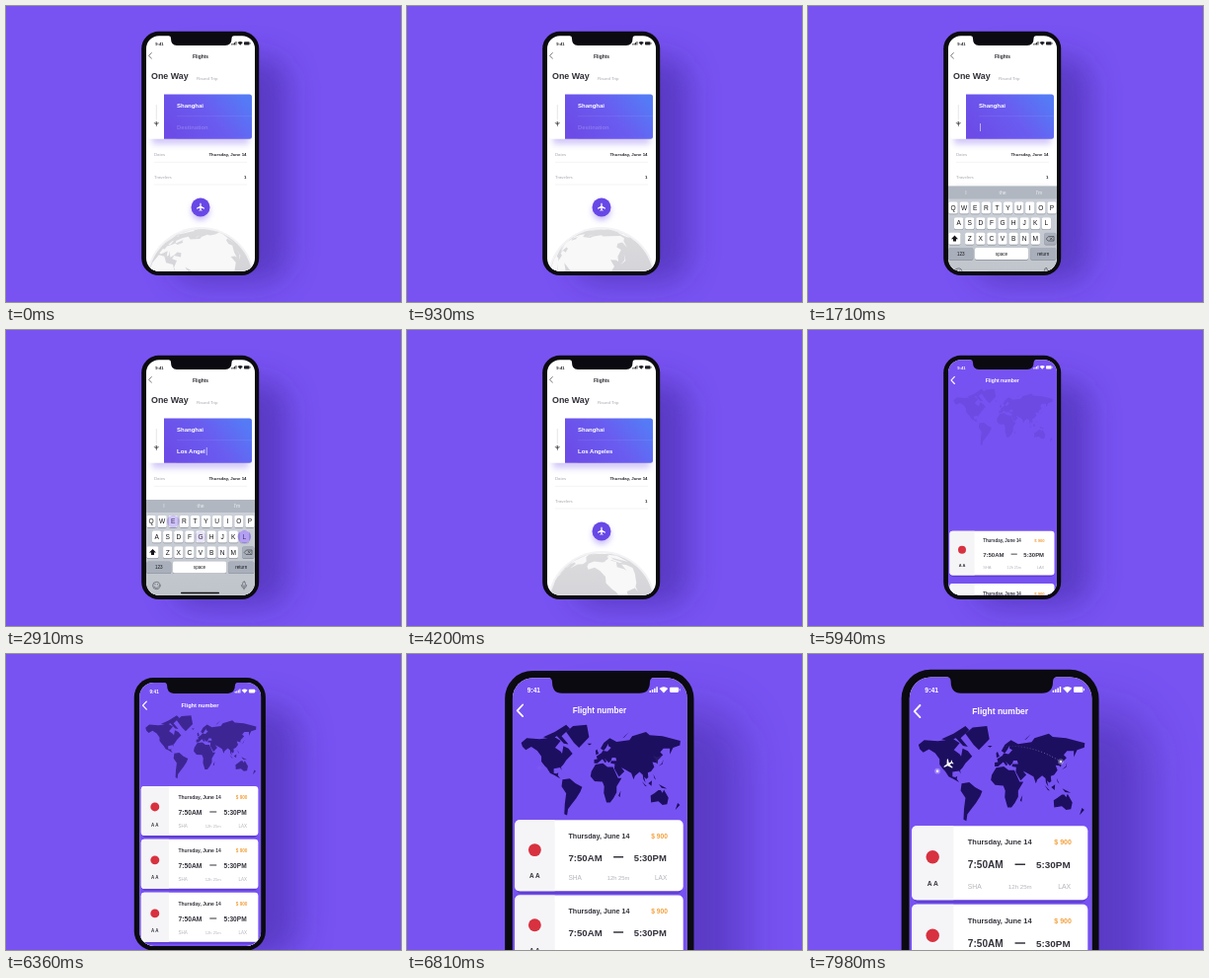
An HTML page that plays this animation: 400x300 px, repeating every 8000 ms.

```html
<!DOCTYPE html>
<html lang="en">
<head>
<meta charset="utf-8">
<title>Flight booking</title>
<style>
  html, body { margin: 0; width: 100%; height: 100%; overflow: hidden; background: #7853f2; }
  svg { display: block; width: 100%; height: 100%; }
  text { font-family: "Liberation Sans", Arial, sans-serif; }
  .b { font-weight: 700; }
  .m { text-anchor: middle; }
  .e { text-anchor: end; }
  .line { fill: none; stroke-linecap: round; stroke-linejoin: round; }
</style>
</head>
<body>
<svg viewBox="0 0 400 300">
  <defs>
    <clipPath id="screenClip"><rect x="142" y="30.300" width="110" height="238.500" rx="13"/></clipPath>
    <linearGradient id="ticketFill" x1="0" y1=".7" x2="1" y2=".3">
      <stop offset="0" stop-color="#6c4be6"/><stop offset=".55" stop-color="#6a5cf0"/><stop offset="1" stop-color="#557af6"/>
    </linearGradient>
    <linearGradient id="keysFill" x1="0" y1="0" x2="0" y2="1">
      <stop offset="0" stop-color="#cdd1d9"/><stop offset="1" stop-color="#bfc4cb"/>
    </linearGradient>
    <linearGradient id="oceanFill" x1="0" y1="0" x2="0" y2="1">
      <stop offset="0" stop-color="#dcdcdf"/><stop offset=".5" stop-color="#d3d3d7"/>
    </linearGradient>
    <linearGradient id="trailFade" gradientUnits="userSpaceOnUse" x1="195" y1="0" x2="225" y2="0">
      <stop offset="0" stop-color="#fff" stop-opacity="0"/><stop offset="1" stop-color="#fff" stop-opacity=".5"/>
    </linearGradient>
    <filter id="wide" x="-60%" y="-50%" width="220%" height="200%"><feGaussianBlur stdDeviation="15"/></filter>
    <filter id="soft" x="-50%" y="-50%" width="200%" height="200%"><feGaussianBlur stdDeviation="3"/></filter>
    <path id="plane" d="M0-5.2Q.8-4.8.8-3.4V-1.2L5 1.5V2.6L.8 1.3V3.6L2 4.5V5.2L0 4.7L-2 5.2V4.5L-.8 3.6V1.3L-5 2.6V1.5L-.8-1.2V-3.4Q-.8-4.8 0-5.2Z"/>
  </defs>
  <rect width="400" height="300" fill="#7853f2"/>
  <g id="phone">
    <rect x="168" y="52" width="118" height="228" rx="26" fill="#3a2399" opacity=".5" filter="url(#wide)"/>
    <rect x="137.200" y="25.800" width="119" height="247.200" rx="17.500" fill="#0b0a10"/>
    <g clip-path="url(#screenClip)">
      <rect x="142" y="30" width="110" height="239" fill="#fff"/>

      <g id="search">
        <path class="line" d="M147.400 47.500L144.500 50.300L147.400 53.100" stroke="#555" stroke-width=".8"/>
        <text class="b m" x="197" y="53" font-size="4.900" fill="#2c2c33">Flights</text>
        <text class="b" x="147" y="73.800" font-size="8.900" fill="#303038">One Way</text>
        <text x="193" y="75.300" font-size="4.400" fill="#a6a6b0">Round Trip</text>

        <rect x="148" y="98" width="98" height="42" fill="#6a4ae8" opacity=".3" filter="url(#soft)"/>
        <rect x="144" y="89.500" width="30" height="45.300" rx="2.500" fill="#fff"/>
        <path d="M160 89.500H246.500Q249 89.500 249 92V132.300Q249 134.800 246.500 134.800H160Z" fill="url(#ticketFill)"/>
        <path d="M152.300 100V115" stroke="#d5d5dc" stroke-width=".6"/>
        <use href="#plane" transform="translate(152.300 119.500) rotate(180) scale(.5)" fill="#444"/>
        <path d="M173 111.600H249" stroke="#fff" stroke-opacity=".12" stroke-width=".6"/>
        <text class="b" x="173" y="102.700" font-size="6" fill="#fff">Shanghai</text>
        <text class="b" id="placeholder" x="173" y="125.400" font-size="5.800" fill="#fff" opacity=".2">Destination</text>
        <text class="b" id="typed" x="173" y="125.400" font-size="6" fill="#fff"></text>
        <path id="caret" d="M0 119V127" stroke="#fff" stroke-width=".6"/>

        <g font-size="4.300" fill="#a6a6b0">
          <text x="150" y="152.200">Dates</text>
          <text x="150" y="175.200">Travelers</text>
        </g>
        <g class="b e" font-size="4.380" fill="#26262c">
          <text x="243.500" y="152.200">Thursday, June 14</text>
          <text x="243.500" y="175.200">1</text>
        </g>
        <path d="M150 158.300H244M150 181H244" stroke="#ececf0" stroke-width=".6"/>

        <circle cx="197" cy="279" r="55" fill="#f3f3f5"/>
        <circle cx="197" cy="279" r="53" fill="url(#oceanFill)"/>
        <path id="globeLand" fill="#f8f8f9"/>
        <circle cx="197" cy="208" r="9" fill="#6a4ae8" opacity=".4" filter="url(#soft)"/>
      </g>

      <circle id="bubble" cx="197" cy="204" r="9.500"/>
      <use id="bubblePlane" href="#plane" fill="#fff"/>

      <g id="keyboard">
        <rect x="142" y="172" width="110" height="97" fill="url(#keysFill)"/>
        <rect x="142" y="172" width="110" height="13" fill="#b1b7c1"/>
        <g class="m" font-size="5" fill="#eceef2">
          <text x="160" y="180">I</text><text x="197" y="180">the</text><text x="234" y="180">I'm</text>
        </g>
        <g id="keys"></g>
        <g id="taps" fill="#7350e6"></g>
        <g class="line" stroke="#555a62" stroke-width=".7">
          <circle cx="152.300" cy="259" r="3.700"/>
          <path d="M150 260Q152.300 263 154.600 260M151 257.500V258M153.600 257.500V258"/>
          <rect x="239.700" y="255" width="2.600" height="5" rx="1.300"/>
          <path d="M238.300 258.500Q238.500 261.500 241 261.500T243.700 258.500M241 261.500V263"/>
        </g>
        <rect x="177" y="265.800" width="39" height="1.500" rx=".7" fill="#111"/>
      </g>

      <g id="results">
        <g id="heading">
          <path class="line" d="M148.400 47.300L145 50.900L148.400 54.500" stroke="#fff" stroke-width="1.100"/>
          <text class="b m" x="196.800" y="52.800" font-size="5.080" fill="#fff">Flight number</text>
        </g>
        <path id="map" fill="#1d0f60"/>
        <g id="route">
          <path id="trail" fill="none" stroke="url(#trailFade)" stroke-width=".5" stroke-dasharray=".5 1.300"/>
          <g fill="#fff">
            <circle cx="158.900" cy="87" r="1.700" opacity=".3"/><circle cx="158.900" cy="87" r=".7"/>
            <circle cx="233.200" cy="81.300" r="1.700" opacity=".3"/><circle cx="233.200" cy="81.300" r=".7"/>
            <use id="jet" href="#plane"/>
          </g>
        </g>
        <g id="cards"></g>
      </g>

      <g id="status" transform="translate(0 .5)">
        <text class="b" x="151.300" y="39.300" font-size="4.100">9:41</text>
        <path d="M228.300 39V37.800H229.200V39ZM229.700 39V37.200H230.600V39ZM231.100 39V36.400H232V39ZM232.500 39V35.500H233.400V39Z"/>
        <path d="M234.500 36.600Q237.200 34.400 239.900 36.600L237.200 39.300Z"/>
        <rect x="241" y="35.700" width="5.600" height="3.300" rx=".7"/>
        <rect x="247" y="36.700" width=".5" height="1.300"/>
      </g>
    </g>
    <path d="M164 29.800Q167 30.300 167 33Q167 40 173 40H222Q228.500 40 228.500 33Q228.500 30.300 231.500 29.800Z" fill="#0b0a10"/>
  </g>
</svg>
<script>
const $ = id => document.getElementById(id);
const set = (el, attrs) => { for (const k in attrs) el.setAttribute(k, attrs[k]); };
const clamp = v => Math.max(0, Math.min(1, v));
const span = (t, start, length) => clamp((t - start) / length);
const lerp = (a, b, p) => a + (b - a) * p;
const easeOut = p => 1 - (1 - p) ** 3;
const easeInOut = p => p < .5 ? 4 * p ** 3 : 1 - 4 * (1 - p) ** 3;
const mix = (a, b, p) => `rgb(${a.map((v, i) => Math.round(lerp(v, b[i], p)))})`;

// Cubic bezier easing (.5, 0, 0, 1)
function zoomEase(x) {
  let lo = 0, hi = 1;
  for (let i = 0; i < 24; i++) {
    const m = (lo + hi) / 2;
    if (1.5 * m * (1 - m) ** 2 + m ** 3 < x) lo = m; else hi = m;
  }
  return 3 * (1 - lo) * lo * lo + lo ** 3;
}

// Rough coastlines as "longitude,latitude" points
const northAmerica = "-168,66 -156,71 -128,70 -95,72 -82,68 -94,60 -82,55 -79,52 -76,62 -65,59 -56,52 -66,45 -70,42 -76,35 -81,31 -80,25 -83,30 -97,28 -97,20 -91,19 -87,21 -88,16 -83,10 -78,8 -85,11 -95,16 -105,20 -112,29 -117,33 -124,40 -124,48 -133,56 -146,61 -158,57 -165,61";
const southAmerica = "-78,8 -62,10 -50,1 -35,-6 -39,-15 -48,-27 -58,-37 -66,-45 -68,-54 -74,-52 -73,-37 -70,-18 -80,-5";
const africa = "-6,35 10,37 20,31 32,31 43,11 51,11 40,-5 40,-16 33,-27 26,-34 18,-34 12,-17 13,-5 9,4 -8,5 -17,14 -15,23";
const eurasia = "-9,37 -9,43 -2,44 -4,48 7,53 10,56 20,55 28,60 22,62 22,65 17,60 12,56 5,59 12,66 25,71 40,67 68,69 74,73 104,77 112,74 140,73 179,68 178,63 163,60 156,51 156,59 142,59 135,54 141,50 130,42 129,36 126,38 118,39 122,31 115,23 108,21 109,12 105,9 100,13 103,2 98,9 97,17 90,22 80,15 77,8 72,20 62,25 50,30 57,23 45,13 35,28 36,36 27,37 28,41 40,41 38,46 30,46 28,42 23,38 13,45 18,40 15,38 9,44 -2,37";
const australia = "114,-22 122,-18 131,-12 136,-12 140,-17 143,-11 153,-26 150,-37 140,-38 131,-32 115,-34";
const arctic = ["-55,82 -25,83 -20,72 -42,60 -53,66 -70,77", "-120,72 -95,77 -70,83 -62,80 -80,73 -65,64 -75,65 -90,73 -105,70", "-24,65 -14,65 -19,63", "53,71 67,77 57,72"];
const islands = ["-5,50 1,52 -3,58 -6,56", "131,32 140,36 142,44 139,37", "109,1 117,6 116,-4", "95,5 106,-5 102,-4", "132,-1 150,-9 138,-8", "173,-35 178,-38 168,-46", "49,-13 47,-25 44,-22", "120,18 126,7 122,11"];
const lands = [northAmerica, southAmerica, africa, eurasia, australia, ...arctic, ...islands]
  .map(s => s.split(" ").map(p => p.split(",").map(Number)));
const rad = Math.PI / 180;
const outline = points => "M" + points.map(p => p.map(v => v.toFixed(2)).join(" ")).join("L") + "Z";

const flat = ([lon, lat]) =>
  [196 + .289 * lon, 97.1 - 23.8 * Math.log(Math.tan(Math.PI / 4 + .4 * lat * rad))];
set($("map"), { d: lands.map(land => outline(land.map(flat))).join("") });

function globePath(centerLon, tilt = 15 * rad) {
  return lands.map(land => {
    let visible = false;
    const points = land.map(([lon, lat]) => {
      const a = (lon - centerLon) * rad, b = lat * rad;
      const depth = Math.cos(b) * Math.cos(a);
      let x = Math.cos(b) * Math.sin(a);
      let y = Math.sin(b) * Math.cos(tilt) - depth * Math.sin(tilt);
      if (Math.sin(b) * Math.sin(tilt) + depth * Math.cos(tilt) > 0) visible = true;
      else { const r = Math.hypot(x, y) || 1; x /= r; y /= r; }
      return [197 + 53 * x, 279 - 53 * y];
    });
    return visible ? outline(points) : "";
  }).join("");
}

// Keyboard
const keyAt = { " ": [196, 240] };
const key = (x, y, w, label, fill = "#fff", size = 6.6) =>
  `<rect x="${x - w / 2}" y="${y - 5.6}" width="${w}" height="12.300" rx="1.600" fill="#888d96"/>
   <rect x="${x - w / 2}" y="${y - 6}" width="${w}" height="12" rx="1.600" fill="${fill}"/>
   <text class="m" x="${x}" y="${y + size * .35}" font-size="${size}" fill="#15151a">${label}</text>`;
let keysMarkup = "";
["QWERTYUIOP", "ASDFGHJKL", "ZXCVBNM"].forEach((row, r) => [...row].forEach((letter, i) => {
  const x = 197 + (i - (row.length - 1) / 2) * 11.1, y = 194 + r * 15.6;
  keyAt[letter] = [x, y];
  keysMarkup += key(x, y, 9.2, letter);
}));
const gray = "#a9b0bb";
keysMarkup += key(148.5, 225.2, 12, "") + key(245.3, 225.2, 12, "", gray)
  + key(154.8, 240.4, 25, "123", gray, 4.6) + key(196, 240.4, 54, "space", "#fff", 4.6) + key(238.2, 240.4, 26, "return", gray, 4.6)
  + `<path d="M148.500 222L152 225.600H150V228H147V225.600H145Z" fill="#15151a"/>
     <path class="line" d="M241.500 225.200L243.500 223H249V227.500H243.500ZM245.200 224.200L247.300 226.300M247.300 224.200L245.200 226.300" stroke="#333" stroke-width=".6"/>`;
$("keys").innerHTML = keysMarkup;

const city = "Los Angeles", typeStart = 1920, typeStep = 120;
$("taps").innerHTML = [...city].map(c => {
  const [x, y] = keyAt[c.toUpperCase()];
  return `<circle cx="${x}" cy="${y}"/>`;
}).join("");
const taps = [...$("taps").children];

// Flight cards
$("cards").innerHTML = [0, 1, 2].map(() => `<g>
  <rect x="144.500" y="3" width="104" height="43.500" rx="3" fill="#2c1590" opacity=".3"/>
  <rect x="143.500" width="106" height="44.700" rx="3" fill="#fff"/>
  <path d="M168.600 0H146.500Q143.500 0 143.500 3V41.700Q143.500 44.700 146.500 44.700H168.600Z" fill="#f5f5f8"/>
  <circle cx="156" cy="18.800" r="4" fill="#d8313f"/>
  <g class="b" fill="#33333c">
    <text class="m" x="156" y="36.300" font-size="4">A A</text>
    <text x="177.200" y="11.500" font-size="4.440">Thursday, June 14</text>
    <text x="177.200" y="25.700" font-size="6">7:50AM</text>
    <text class="e" x="239" y="25.700" font-size="5.900">5:30PM</text>
    <text class="e" x="239.700" y="11.500" font-size="4.150" fill="#f3a03c">$ 900</text>
  </g>
  <path d="M205.600 23.300H211.800" stroke="#33333c" stroke-width=".9"/>
  <g fill="#b4b4bc" font-size="4.050">
    <text x="177.200" y="38">SHA</text>
    <text class="m" x="208.700" y="37.800" font-size="3.650">12h 25m</text>
    <text class="e" x="239.300" y="38">LAX</text>
  </g></g>`).join("");
const cards = [...$("cards").children];

// Flight arc from Shanghai to Los Angeles
const from = [233.2, 81.3], bend = [199.8, 60], to = [158.9, 87];

function drawSearch(t) {
  set($("globeLand"), { d: globePath(70 + t * .038) });
  const count = Math.max(0, Math.min(city.length, Math.floor((t - typeStart) / typeStep) + 1));
  const typed = $("typed"), text = city.slice(0, count);
  if (typed.textContent !== text) typed.textContent = text;
  set($("placeholder"), { opacity: t < 1550 ? .2 : 0 });
  const width = count ? typed.getComputedTextLength() : 0;
  const blink = t > 1550 && t < 3450 && (count > 0 && count < city.length || t % 800 < 450);
  set($("caret"), { transform: `translate(${174.5 + width} 0)`, opacity: blink ? .9 : 0 });

  const shown = easeOut(span(t, 1500, 400)) - easeInOut(span(t, 3450, 400));
  set($("keyboard"), { transform: `translate(0 ${100 * (1 - shown)})` });
  taps.forEach((tap, i) => {
    const age = t - typeStart - i * typeStep, p = span(age, 0, 420);
    set(tap, { r: lerp(6.8, 5.5, p), opacity: age < 0 ? 0 : .6 * (1 - p) ** 1.3 });
  });
}

function drawBubble(t) {
  const p = easeInOut(span(t, 5004, 600));
  set($("bubble"), { r: lerp(9.5, 190, p), fill: mix([104, 72, 230], [119, 82, 242], span(t, 5000, 250)) });
  set($("bubblePlane"), {
    transform: `translate(197 203.600) scale(${lerp(.8, 1.1, clamp(p * 3.5))})`,
    opacity: 1 - span(t, 5450, 200)
  });
  set($("status"), { fill: mix([30, 30, 36], [255, 255, 255], span(t, 4950, 450)) });
}

function drawResults(t) {
  set($("results"), { visibility: t > 5550 ? "visible" : "hidden" });
  set($("heading"), { opacity: span(t, 5600, 250) });
  set($("map"), { opacity: span(t, 5850, 800) });
  cards.forEach((card, i) => {
    const rise = 150 * (1 - easeOut(span(t, 5800 + 15 * i, 800)));
    set(card, { transform: `translate(0 ${120 + 47.4 * i + rise})` });
  });

  const p = .92 * span(t, 6950, 1030);
  const a = from.map((v, i) => lerp(v, bend[i], p));
  const b = bend.map((v, i) => lerp(v, to[i], p));
  const at = a.map((v, i) => lerp(v, b[i], p));
  const heading = Math.atan2(b[1] - a[1], b[0] - a[0]) / rad + 90;
  set($("route"), { opacity: span(t, 6800, 250) });
  set($("trail"), { d: `M${from}Q${a} ${at}` });
  set($("jet"), { transform: `translate(${at}) rotate(${heading}) scale(.6)` });
}

function frame(now) {
  const t = now % 8000;
  const zoom = 1 + .68 * zoomEase(span(t, 6035, 1395));
  set($("phone"), { transform: `translate(199.8 40.4) scale(${zoom}) translate(-199.8 -40.4)` });
  drawSearch(t);
  drawBubble(t);
  drawResults(t);
  requestAnimationFrame(frame);
}
requestAnimationFrame(frame);
</script>
</body>
</html>
```
